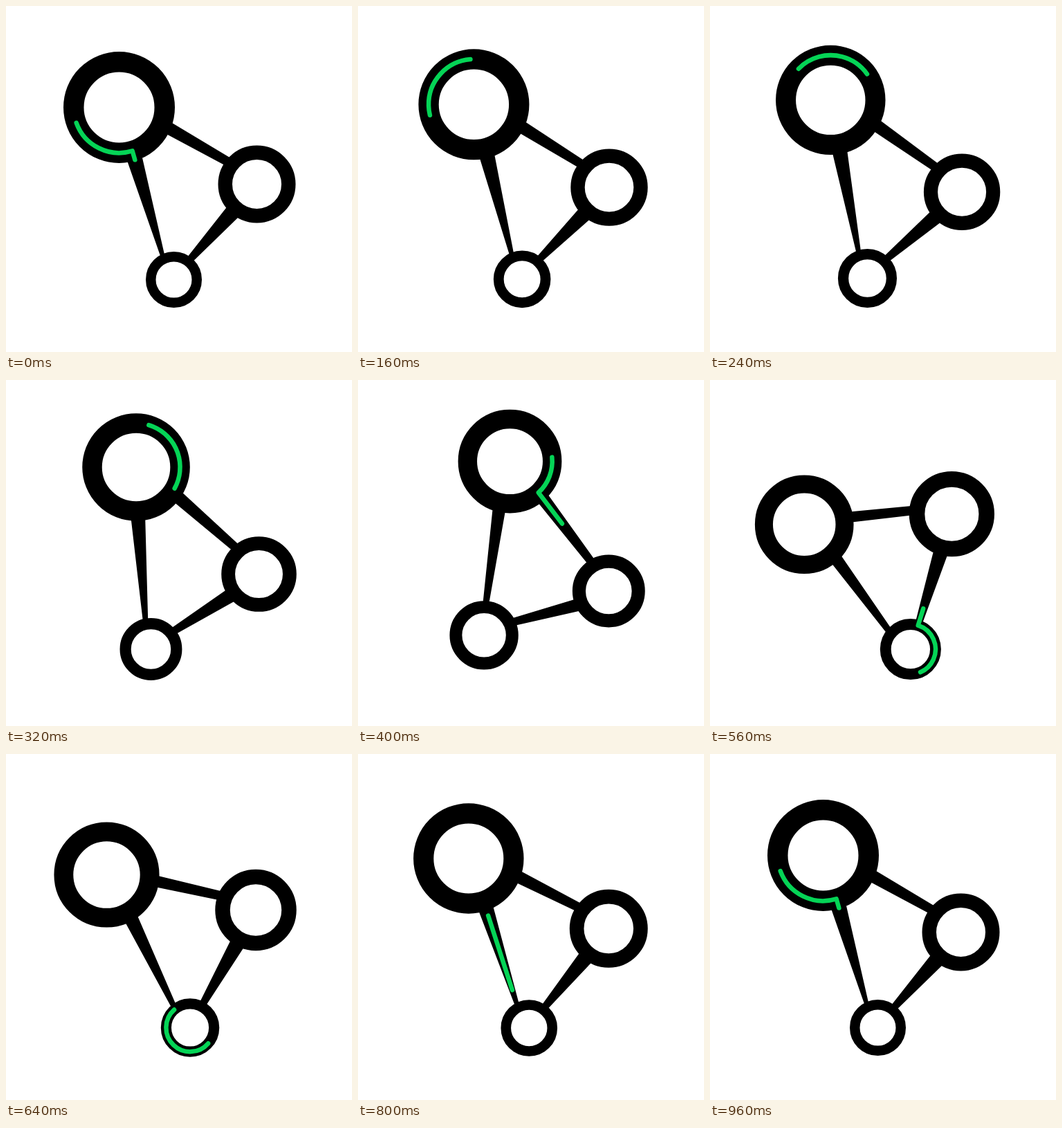
Animation, 500 px wide and 500 px high, one loop 1000 ms. Source, as an HTML page:

```html
<!DOCTYPE html>
<html lang="en">
<head>
<meta charset="utf-8">
<title>Rotating nodes</title>
<style>
  html, body { margin: 0; width: 100%; height: 100%; overflow: hidden; background: #fff; }
  svg { display: block; width: 100%; height: 100%; }
</style>
</head>
<body>
<svg viewBox="0 0 500 500">
  <path id="links"/>
  <g id="rings" fill="#fff" stroke="#000"><circle/><circle/><circle/></g>
  <path id="trail" fill="none" stroke="#05d456" stroke-width="6.5" stroke-linecap="round" stroke-linejoin="round"/>
</svg>
<script>
const LOOP = 1000, STEP = 40, TURN = 960, TRAIL = 113;

// Closed track of the nodes: four knots per third of a turn.
const KNOTS = [0, 0.111, 0.5, 0.889];
const TRACK = [
  [163.5, 146.5], [188, 126], [295.5, 138], [361, 225.5],
  [362.5, 257.5], [365.5, 280.5], [335.5, 355.5], [266, 395.5],
  [242.5, 395.5], [209.5, 389], [145.5, 292.5], [145.5, 174.5]
];
const OUTER = [80.5, 56, 40.5], INNER = [51, 35.5, 26];

// Link shape every half step: near width, far width, near offset, far offset (outwards).
const LINKS = [
  [18, 13.3, 8.6, 8], [19, 10.5, 1.8, 2.6],
  [22, 10.6, 0, -1.5], [13, 12.5, 8, -6.6],
  [6.5, 22, 5, 1.2], [12, 14, 3, 10]
];

// Distance of the trail's head from where it leaves the first ring.
const HEAD = [-254.4, -135.7, -7.2, 123, 287, 416], HEAD_LAP = 791;

const links = document.getElementById('links');
const trail = document.getElementById('trail');
const circles = [...document.querySelectorAll('#rings circle')];

const mod = (i, n) => ((i % n) + n) % n;
const mix = (a, b, u) => a + (b - a) * u;
const cyclic = (list, q) => {
  const i = Math.floor(q);
  return [list[mod(i, list.length)], list[mod(i + 1, list.length)], q - i];
};

// Cubic through knots i and i+1 with slopes taken from their neighbours.
function spline(time, value, i, t) {
  const slope = k => {
    const a = time(k) - time(k - 1), b = time(k + 1) - time(k);
    const left = (value(k) - value(k - 1)) / a, right = (value(k + 1) - value(k)) / b;
    return (left * b + right * a) / (a + b);
  };
  const h = time(i + 1) - time(i), u = (t - time(i)) / h, v = 1 - u;
  return v * v * (1 + 2 * u) * value(i) + u * u * (1 + 2 * v) * value(i + 1)
    + h * u * v * (v * slope(i) - u * slope(i + 1));
}

function ease(x) {
  const a = 0.77;
  let lo = 0, hi = 1;
  for (let n = 0; n < 30; n++) {
    const s = (lo + hi) / 2, r = 1 - s;
    if (3 * a * s * r * r + 3 * (1 - a) * s * s * r + s * s * s < x) lo = s; else hi = s;
  }
  return lo * lo * (3 - 2 * lo);
}

const knotTime = i => Math.floor(i / 4) + KNOTS[mod(i, 4)];

function nodeAt(q) {
  let i = Math.floor(q) * 4;
  while (knotTime(i + 1) <= q) i++;
  const axis = k => spline(knotTime, j => TRACK[mod(j, 12)][k], i, q);
  const size = list => mix(...cyclic(list, q));
  const R = size(OUTER), r = size(INNER);
  return { x: axis(0), y: axis(1), R, mid: (R + r) / 2, width: R - r };
}

// Link between the outer edges of two rings, extended into the middle of each ring.
function linkAt(a, b, q) {
  const [k0, k1, u] = cyclic(LINKS, q * 2);
  const [w0, w1, o0, o1] = k0.map((v, i) => mix(v, k1[i], u));
  const gap = Math.hypot(b.x - a.x, b.y - a.y);
  const dx = (b.x - a.x) / gap, dy = (b.y - a.y) / gap;
  const edge = (n, o, sign) => {
    const along = sign * Math.sqrt(n.R * n.R - o * o);
    return { x: n.x + dx * along + dy * o, y: n.y + dy * along - dx * o };
  };
  const p0 = edge(a, o0, 1), p1 = edge(b, o1, -1);
  const visible = Math.hypot(p1.x - p0.x, p1.y - p0.y);
  const extend = (n, k) => {
    const x = mix(p0.x, p1.x, k) - n.x, y = mix(p0.y, p1.y, k) - n.y;
    const f = n.mid / Math.hypot(x, y);
    return { x: n.x + x * f, y: n.y + y * f, w: mix(w0, w1, k) };
  };
  const from = extend(a, -a.width / 2 / visible);
  const to = extend(b, 1 + b.width / 2 / visible);
  const side = (p, s) => `${p.x + s * dy * p.w / 2} ${p.y - s * dx * p.w / 2}`;
  const shape = `M${side(from, 1)}L${side(to, 1)}L${side(to, -1)}L${side(from, -1)}Z`;
  return { from, to, shape, length: Math.hypot(to.x - from.x, to.y - from.y) };
}

function arcAt(node, a, b) {
  const angle = p => Math.atan2(p.y - node.y, p.x - node.x);
  const span = mod(angle(b) - angle(a), 2 * Math.PI);
  return {
    d: `A${node.mid} ${node.mid} 0 ${span > Math.PI ? 1 : 0} 1 ${b.x} ${b.y}`,
    length: span * node.mid
  };
}

function draw(ms) {
  const x = Math.min(ms / TURN, 1), p = ease(x);
  const nodes = [0, 1, 2].map(k => nodeAt(k + p));
  const [ab, bc, ca] = nodes.map((n, k) => linkAt(n, nodes[(k + 1) % 3], k + p));

  links.setAttribute('d', ab.shape + bc.shape + ca.shape);
  nodes.forEach((n, k) => {
    const c = circles[k];
    c.setAttribute('cx', n.x);
    c.setAttribute('cy', n.y);
    c.setAttribute('r', n.mid);
    c.setAttribute('stroke-width', n.width);
  });

  const ringA = arcAt(nodes[0], ca.to, ab.from);
  const ringB = arcAt(nodes[1], ab.to, bc.from);
  const ringC = arcAt(nodes[2], bc.to, ca.from);
  const line = q => `L${q.x} ${q.y}`;
  trail.setAttribute('d', `M${ca.from.x} ${ca.from.y}` + line(ca.to) + ringA.d
    + line(ab.to) + ringB.d + line(bc.to) + ringC.d);

  const t = x * 6;
  const head = spline(k => k, k => HEAD[mod(k, 6)] + HEAD_LAP * Math.floor(k / 6), Math.floor(t), t);
  const start = ca.length + ringA.length + head - TRAIL;
  trail.setAttribute('stroke-dasharray', `${TRAIL} 5000`);
  trail.setAttribute('stroke-dashoffset', -start);
}

const origin = performance.now();
function tick() {
  const ms = (performance.now() - origin) % LOOP;
  draw(Math.floor(ms / STEP) * STEP);
  requestAnimationFrame(tick);
}
tick();
</script>
</body>
</html>
```
